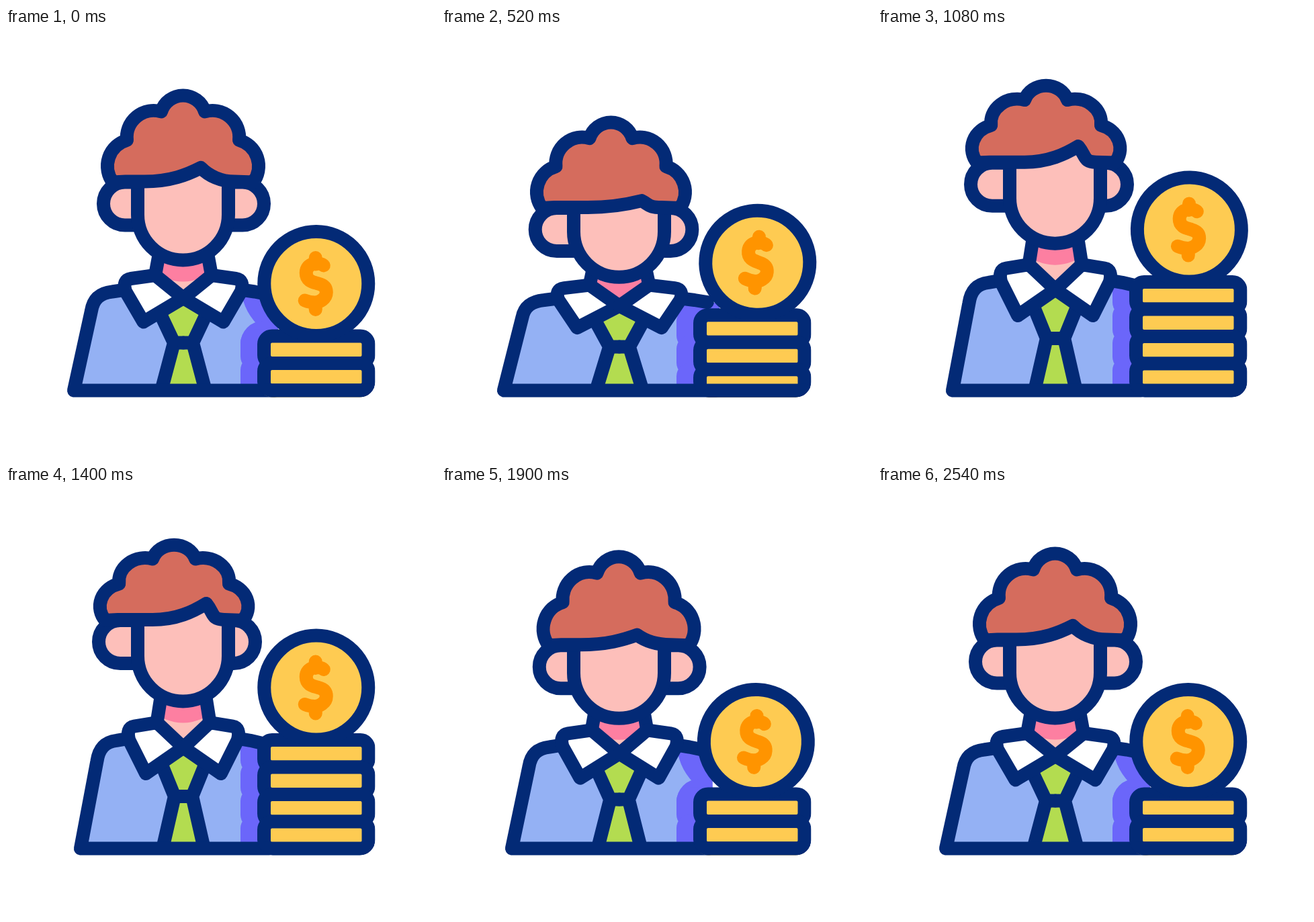
Animation of 640 by 640 pixels, one loop 2.88 s. Source, as an HTML page with a canvas:

```html
<!DOCTYPE html>
<html lang="en">
<head>
<meta charset="utf-8">
<title>Employee and coins</title>
<style>
  html, body { margin: 0; width: 100%; height: 100%; overflow: hidden; background: #fff; }
  canvas { display: block; width: 100%; height: 100%; }
</style>
</head>
<body>
<canvas id="stage" width="640" height="640"></canvas>
<script>
const ctx = document.getElementById('stage').getContext('2d');
const LOOP = 2880, TICK = 20;
const NAVY = '#032a76', HAIR = '#d56c5d', SKIN = '#fdbfba', BLUSH = '#fd7fa1', SHIRT = '#94b1f4',
      SHADE = '#6b66fa', TIE = '#b3dc50', GOLD = '#fecb52', ORANGE = '#ff9400';

// Motion rules; t counts ticks of 20 ms.
function ease(t, from, to) {
  const u = Math.min(1, Math.max(0, (t - from) / (to - from)));
  return u * u * (3 - 2 * u);
}
function wobble(t, start, half, swings, amp) {
  const u = t - start;
  return u < 0 || u > half * swings ? 0 : amp * Math.exp(-u / 50) * Math.sin(Math.PI * u / half);
}
// Squash (negative) and stretch (positive): the head repeats the body's bounce with a lag.
const bounce = t => -1.1 * ease(t, 10, 20) + 2.1 * ease(t, 20, 53) - 2 * ease(t, 70, 84)
  + 1.8 * ease(t, 84, 101) - .8 * ease(t, 101, 118);
const split = (q, up, down) => q * (q > 0 ? up : down);
const turn = t => ease(t, 10, 30) - ease(t, 70, 98);
const chin = t => -25 * bounce(t - 2);
const nod = t => split(bounce(t - 6), -4.5, -12);
const hairScale = t => 1 - .045 * turn(t) - split(bounce(t - 8), .085, .03);
const rise = t => 80.5 * (ease(t, 15, 41) - ease(t, 70, 83));
const sway = t => wobble(t, 16, 18, 3, 10) + wobble(t, 78, 11, 3, -8);

function shape(d, m) {
  const p = new Path2D();
  p.addPath(new Path2D(d), m);
  return p;
}
function fill(p, color) {
  ctx.fillStyle = color;
  ctx.fill(p);
}
function stroke(p, color = NAVY) {
  ctx.strokeStyle = color;
  ctx.stroke(p);
}
function clipped(p, draw) {
  ctx.save();
  ctx.clip(p);
  draw();
  ctx.restore();
}
function box(x, y, w, h, r) {
  const p = new Path2D();
  p.roundRect(x, y, w, h, r);
  return p;
}
function disc(x, y, r) {
  const p = new Path2D();
  p.arc(x, y, r, 0, 2 * Math.PI);
  return p;
}
const layers = up => [0, 1, 2, 3].map(i => 458.5 - up + 40.5 * i);

function drawBody(t) {
  const s = bounce(t), sx = 1 - .061 * s, sy = 1 + .093 * s, up = rise(t);
  const at = flip => new DOMMatrix([sx * flip, 0, 0, sy, 264 - 264 * sx * flip, 539.5 * (1 - sy)]);
  const both = d => [shape(d, at(1)), shape(d, at(-1))];
  const side = 'M175 390L158 392.5C140 394.5 130 403 127 421L101 539.5';

  const torso = shape(side + 'H405V398L370 392.5L353 390Z', at(1));
  fill(torso, SHIRT);
  clipped(torso, () => {
    fill(disc(436.75, 380.5 - up, 87.5), SHADE);
    fill(box(349, 436 - up, 176, 70, 34), SHADE);
    layers(up).forEach(y => fill(box(349, y - 10, 176, 60.5, 20), SHADE));
  });

  const neck = shape('M229 325H299L306 368L264 402L222 368Z', at(1));
  fill(neck, SKIN);
  clipped(neck, () => fill(disc(263.5, 310 + chin(t), 67.5), BLUSH));
  both('M229 330L222 368').forEach(p => stroke(p));

  fill(shape('M264 402L299 424L278 468.5L297 539.5H231L250 468.5L229 424Z', at(1)), TIE);
  both('M229 424L250 468.5H264M250 468.5L231.5 538').forEach(p => stroke(p));
  stroke(shape(side + 'H400M353 390L370 392.5L388 396', at(1)));

  both('M222 368L186 373Q173 375 178 392L204.5 437.5L264 402Z').forEach(p => {
    fill(p, '#fff');
    stroke(p);
  });
}

function drawHead(t) {
  const c = chin(t), e = nod(t), k = turn(t), v = hairScale(t);
  const base = 228.5 + c + e;

  const ear = (from, x, sweep) => {
    const p = new Path2D(`M${from} ${base + 1}H${x}a32 32 0 0 ${sweep} 0 64H${from}`);
    fill(p, SKIN);
    stroke(p);
  };
  ear(196, 177 - 7 * k, 0);
  ear(331, 352 - 13 * k, 1);

  const face = top => new Path2D(`M196 ${top}V${278 + c}a67.5 67.5 0 0 0 135 0V${top}`);
  fill(face(base - 22), SKIN);
  stroke(face(base));

  // Hair is drawn at rest and mapped; only the tip of the fringe moves on its own.
  const hx = 1 - .02 * k, shift = -8.13 * k;
  const px = (290 + 8 * k - shift) / hx, lift = (20.5 - .8 * e) / v, py = 228.5 - lift;
  const hair = shape(
    'M159 229.5A40 40 0 0 1 180 167A40 40 0 0 1 231 124.5A34 34 0 0 1 296 124.5' +
    'A40 40 0 0 1 347 167A40 40 0 0 1 368 229.5L340 228.5' +
    `C320 228.5 ${px + 12} ${py + .6 * lift} ${px} ${py}` +
    `C${px - 20} ${py + .5 * lift} ${px - 45} 228.5 ${206 + 25 * k} 228.5H178Z`,
    new DOMMatrix([hx, 0, 0, v, shift, base - 228.5 * v]));
  fill(hair, HAIR);
  stroke(hair);
}

const dollar = new Path2D('M11-27C4-33-15-31-15-16C-15-3-3-2 3 0C11 2 15 6 15 13' +
  'C15 23 4 28-2 28C-8 28-12 27-17 25M-1-38.5V-29M-1 29V38.5');

function drawCoins(t) {
  const up = rise(t), dx = sway(t);
  clipped(box(374, 0, 175.5, 549.5, 23), () => {
    layers(up).forEach(y => {
      const p = box(384, y, 155.5, 40.5, 12);
      fill(p, GOLD);
      stroke(p);
    });
    stroke(new Path2D('M384 539.5H540'));
  });

  ctx.save();
  ctx.translate(461.75 + dx, 380.5 - up);
  ctx.rotate(dx / 100);
  const coin = disc(0, 0, 77.5);
  fill(coin, GOLD);
  stroke(coin);
  stroke(dollar, ORANGE);
  ctx.restore();
}

function frame(now) {
  const t = (now % LOOP) / TICK;
  ctx.fillStyle = '#fff';
  ctx.fillRect(0, 0, 640, 640);
  ctx.lineWidth = 20;
  ctx.lineCap = ctx.lineJoin = 'round';
  drawBody(t);
  drawHead(t);
  drawCoins(t);
  requestAnimationFrame(() => frame(performance.now()));
}
frame(performance.now());
</script>
</body>
</html>
```
